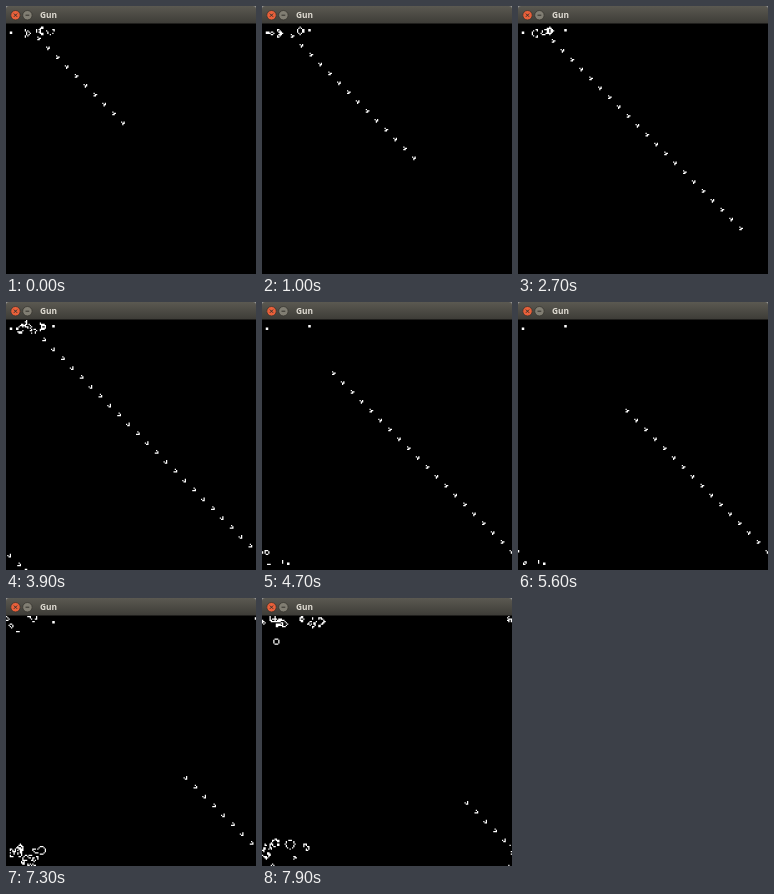
Animation, 250 px wide and 268 px high, one loop 8 s. Source, as an HTML page with a canvas:

```html
<!DOCTYPE html>
<html>
<head>
<meta charset="utf-8">
<title>Gun</title>
<style>
html, body { margin: 0; width: 100%; height: 100%; overflow: hidden; background: #000; }
canvas { display: block; }
</style>
</head>
<body>
<canvas id="stage" width="250" height="268"></canvas>
<script>
const ctx = document.getElementById('stage').getContext('2d');
const SIZE = 200, CELL = 1.25, BAR = 17.5, TOP = 18;
const GUN_X = 3, GUN_Y = 2;
const FRAME_MS = 100, FRAMES = 80;

const GUN = [
  '........................O...........',
  '......................O.O...........',
  '............OO......OO............OO',
  '...........O...O....OO............OO',
  'OO........O.....O...OO..............',
  'OO........O...O.OO....O.O...........',
  '..........O.....O.......O...........',
  '...........O...O....................',
  '............OO......................'
];

// The pace varies a little: [time in ms, generation reached].
const PACE = [[0, 296], [900, 394.7], [2700, 634.7], [3900, 793.6], [7900, 1327.2]];

function generationAt(ms) {
  const k = PACE.findIndex(([t]) => t >= ms);
  if (k < 1) return PACE[0][1];
  const [t0, g0] = PACE[k - 1], [t1, g1] = PACE[k];
  return Math.floor(g0 + (g1 - g0) * (ms - t0) / (t1 - t0));
}

// One generation on a torus; a world is a list of live cell indices.
function step(world) {
  const count = new Uint8Array(SIZE * SIZE);
  const alive = new Uint8Array(SIZE * SIZE);
  for (const i of world) {
    alive[i] = 1;
    const x = i % SIZE, y = (i - x) / SIZE;
    for (let dy = -1; dy <= 1; dy++) {
      const row = (y + dy + SIZE) % SIZE * SIZE;
      for (let dx = -1; dx <= 1; dx++) {
        if (dx || dy) count[row + (x + dx + SIZE) % SIZE]++;
      }
    }
  }
  const next = [];
  count.forEach((n, i) => {
    if (n === 3 || (n === 2 && alive[i])) next.push(i);
  });
  return next;
}

function buildWorlds() {
  let world = [], generation = 0;
  GUN.forEach((line, y) => [...line].forEach((c, x) => {
    if (c === 'O') world.push((y + GUN_Y) * SIZE + x + GUN_X);
  }));
  const worlds = [];
  for (let n = 0; n < FRAMES; n++) {
    for (const goal = generationAt(n * FRAME_MS); generation < goal; generation++) {
      world = step(world);
    }
    worlds.push(world);
  }
  return worlds;
}

function button(x, fill, mark) {
  ctx.beginPath();
  ctx.arc(x, 9.2, 4.7, 0, 7);
  ctx.fillStyle = fill;
  ctx.fill();
  ctx.lineWidth = 0.7;
  ctx.strokeStyle = '#33312c';
  ctx.stroke();
  ctx.lineWidth = 1;
  ctx.stroke(new Path2D(mark));
}

function drawTitleBar() {
  const bar = ctx.createLinearGradient(0, 0, 0, BAR);
  bar.addColorStop(0, '#5b5951');
  bar.addColorStop(1, '#3d3c37');
  ctx.fillStyle = '#999';
  ctx.fillRect(0, 0, 250, 4);
  ctx.fillStyle = bar;
  ctx.beginPath();
  ctx.roundRect(0, 0, 250, BAR, [3, 3, 0, 0]);
  ctx.fill();
  button(9.5, '#e9603a', 'M7.9 7.6l3.2 3.2m0-3.2l-3.2 3.2');
  button(21.4, '#817e73', 'M19.5 9.2h3.8');
  ctx.fillStyle = '#dfdbd2';
  ctx.font = 'bold 8.4px "Open Sans", "Noto Sans", sans-serif';
  ctx.fillText('Gun', 34, 12.3);
}

function draw(world) {
  ctx.globalCompositeOperation = 'source-over';
  ctx.fillStyle = '#000';
  ctx.fillRect(0, 0, 250, 268);
  drawTitleBar();
  // Additive blending keeps touching cells free of seams.
  ctx.globalCompositeOperation = 'lighter';
  ctx.fillStyle = '#fff';
  for (const i of world) {
    const x = i % SIZE, y = (i - x) / SIZE;
    ctx.fillRect(x * CELL, TOP + y * CELL, CELL, CELL);
  }
}

const worlds = buildWorlds();
const start = performance.now();
function tick() {
  const ms = Math.max(0, performance.now() - start);
  draw(worlds[Math.floor(ms / FRAME_MS) % FRAMES]);
  requestAnimationFrame(tick);
}
tick();
</script>
</body>
</html>
```
